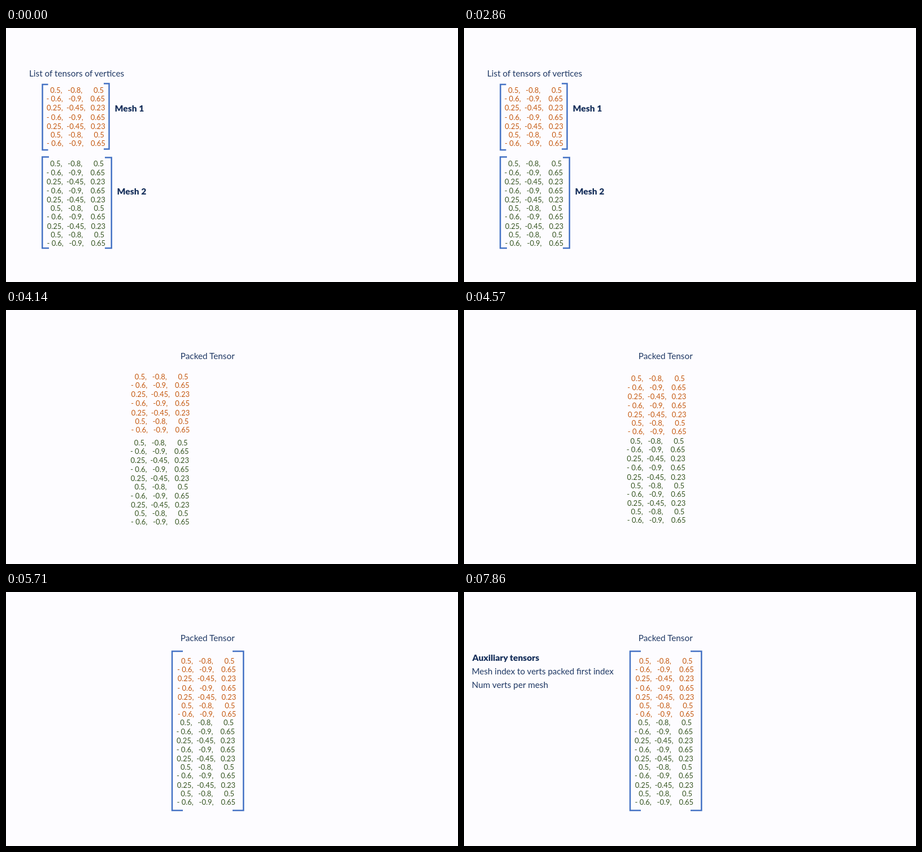
An HTML page for the animation above (8 s loop, 800x450 px).

```html
<!DOCTYPE html>
<html lang="en">
<head>
<meta charset="utf-8">
<title>Packed tensor</title>
<style>
  html, body { margin: 0; width: 100%; height: 100%; overflow: hidden; background: #fdfcff; }
  svg { display: block; width: 100%; height: 100%; }
  text { font-family: Lato, "Open Sans", sans-serif; font-size: 15.3px; fill: #1f3864; white-space: pre; }
  .bold { font-weight: 900; font-size: 15.6px; fill: #17305c; }
  .rows text { font-size: 13px; }
  #first text { fill: #c55a11; }
  #second text { fill: #385723; }
  path { fill: none; stroke: #4472c4; stroke-width: 2.5; }
</style>
</head>
<body>
<svg viewBox="0 0 800 450">
  <g id="list">
    <text x="41" y="86.4">List of tensors of vertices</text>
    <text class="bold" x="192.6" y="148.3">Mesh 1</text>
    <text class="bold" x="196.6" y="295.2">Mesh 2</text>
    <path d="M74.5 100H64.5V216H74.5M173 98.5H182.5V214.5H173"/>
    <path d="M76 228.5H64.2V390H76M175 229.5H186.7V390H175"/>
  </g>
  <g id="first" class="rows"></g>
  <g id="second" class="rows"></g>
  <text id="title" x="308.8" y="87.4">Packed Tensor</text>
  <path id="frame" d="M313 105H294V387H313M401 105H420.3V387H401"/>
  <g id="aux">
    <text class="bold" x="14.8" y="122.3">Auxiliary tensors</text>
    <text x="13.8" y="146.4" style="font-size:15.1px">Mesh index to verts packed first index</text>
    <text x="13.8" y="170.3">Num verts per mesh</text>
  </g>
</svg>
<script>
const LOOP = 8000;
const $ = id => document.getElementById(id);

// Each kind of row: cell text and left edge
const kinds = {
  A: [["0.5,", 78.3], ["-0.8,", 109.3], ["0.5", 154.9]],
  B: [["- 0.6,", 71.3], ["-0.9,", 110.4], ["0.65", 149.3]],
  C: [["0.25,", 71.8], ["-0.45,", 106.8], ["0.23", 149.5]]
};
const order = "ABCBCABCAB";
const rowY = [0, 15.2, 31.2, 47.4, 63.6, 78.6, 94, 110.2, 125.2, 140.4];

function addRows(group, count, top) {
  for (let i = 0; i < count; i++) {
    for (const [label, x] of kinds[order[i]]) {
      const cell = document.createElementNS(group.namespaceURI, "text");
      cell.setAttribute("x", x + i * 0.13);
      cell.setAttribute("y", top + rowY[i]);
      cell.textContent = label;
      group.append(cell);
    }
  }
}
addRows($("first"), 7, 115.2);
addRows($("second"), 10, 245.4);

const ramp = (t, start, length) => Math.min(1, Math.max(0, (t - start) / length));
const ease = u => u < 0.5 ? 2 * u * u : 1 - 2 * (1 - u) * (1 - u);
const fade = (id, v) => $(id).setAttribute("opacity", v);
const move = (id, x, y) => $(id).setAttribute("transform", `translate(${x} ${y})`);

function draw(t) {
  const swap = ramp(t, 2980, 510);
  fade("list", 1 - swap);
  fade("title", swap);

  const k = ease(ramp(t, 3138, 1732));
  move("first", 231.6 * k, 12 * k);
  move("second", 230 * k, -8.9 * k);

  fade("frame", ramp(t, 4985, 520));
  fade("aux", ramp(t, 6410, 520));
}

const began = performance.now();
function tick() {
  draw((performance.now() - began) % LOOP);
  requestAnimationFrame(tick);
}
tick();
</script>
</body>
</html>
```
